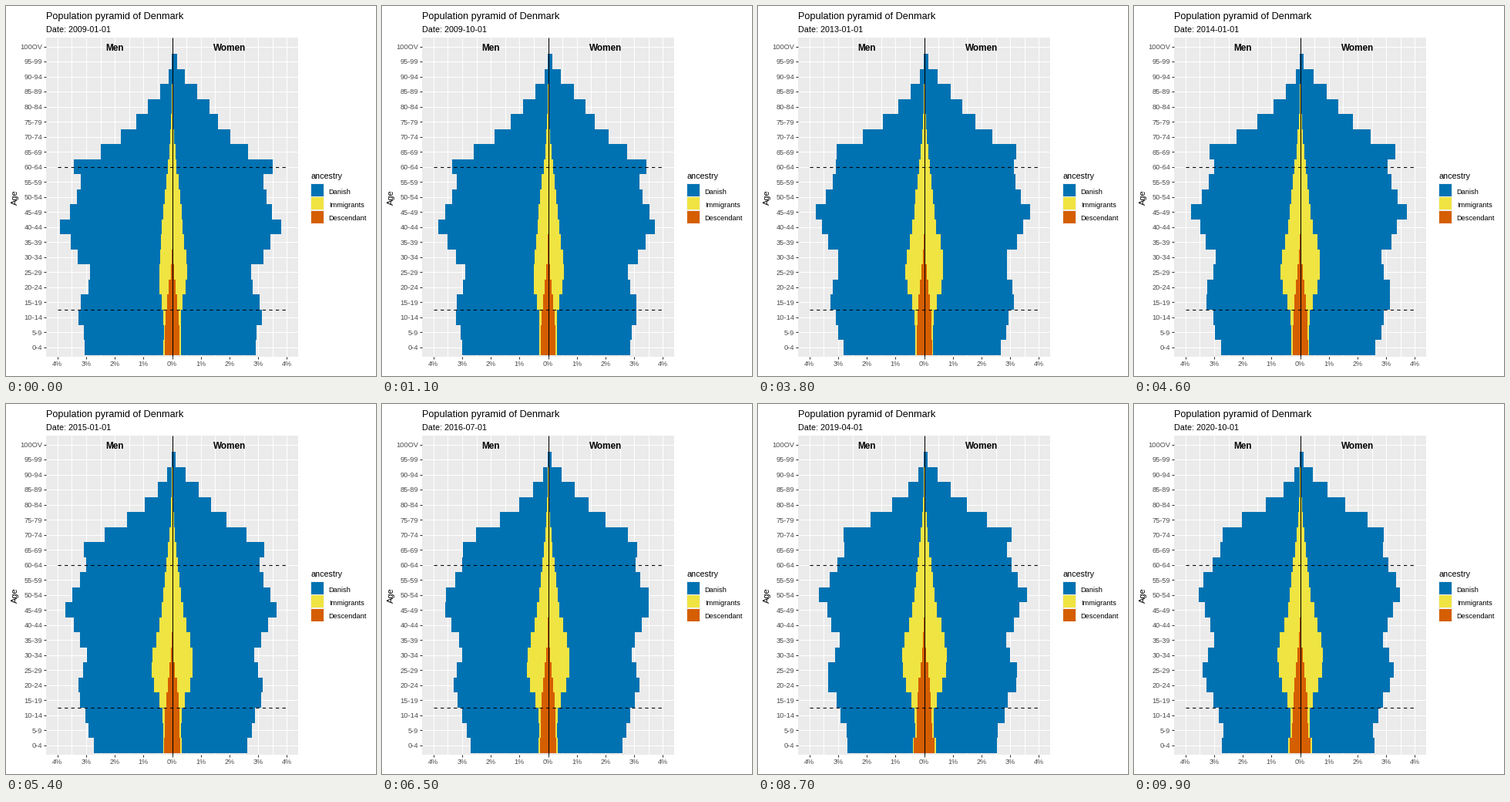
Animation, 480 px wide and 480 px high, one loop 10 s. Source, as a matplotlib script:

```python
import numpy as np
import matplotlib.pyplot as plt
from matplotlib.animation import FuncAnimation
from matplotlib.patches import Polygon, Rectangle

SIZE, DPI = 480, 72
FRAMES, INTERVAL = 100, 100
LEFT, RIGHT, TOP, BOTTOM = 52, 379, 41, 455
MID, UNIT, STEP = 215.55, 37.2, 19.513
BLUE, YELLOW, ORANGE = "#0072B2", "#F0E442", "#D55E00"
GREY = "#4D4D4D"
AGES = [f"{a}-{a + 4}" for a in range(0, 100, 5)] + ["100OV"]
N = len(AGES)
AGE = 5 * np.arange(N) + 2.5  # middle of each group

# Cohort size at birth, in pixels of bar length, every five years.
BIRTH_YEARS = np.arange(1911.5, 2022, 5)
BIRTHS = [27, 27.4, 36, 44, 49, 60, 76.5, 100.5, 91, 94, 100, 110.5,
          101.5, 97.5, 89.5, 97, 111, 118, 113, 113, 105.5, 105, 115]

plt.rcParams.update({"font.family": "Liberation Sans",
                     "figure.dpi": DPI, "savefig.dpi": DPI})


def sigmoid(x):
    return 1 / (1 + np.exp(-x))


def bell(x, mid, width):
    return np.exp(-((x - mid) / width) ** 2)


def population(q):
    """Bar lengths (men, women) of the three stacked layers at quarter q."""
    u = q / 47
    born = 2009 + q / 4 - AGE

    # Cohorts grow by migration, shrink by mortality and by their share.
    hazard = np.exp((AGE - 86.6) / 8.5)
    gain = 0.3 * sigmoid((AGE - 25) / 6) - 0.0015 * q
    men = np.interp(born, BIRTH_YEARS, BIRTHS) * np.exp(gain - hazard)
    survive = (0.75 - 0.25 * u) * hazard / (1 + 0.15 * hazard)
    women = men * (0.945 + 0.0004 * AGE) * np.exp(survive)

    # Immigrants: a plateau of working ages and a growing wave of young adults.
    rise = 0.1 + 0.9 * sigmoid((AGE - 19) / 2.8)
    plateau = 16 * rise * sigmoid((58 + 8 * u - AGE) / 9)
    wave = 11 * (1 - (1 - u) ** 2) * bell(AGE, 27 + 7 * u, 10)

    descendants = (10.5 * sigmoid((21 + 8 * u - AGE) / 5.5)
                   + 4 * sigmoid(born - 2015.5))
    foreign = descendants + plateau + wave
    more_women = 2.6 * bell(AGE, 30.5 + 15 * u, 5) - 0.6
    return ((men, women), (foreign, foreign + more_women),
            (descendants, descendants - 0.8))


EDGES = np.floor(453.03 - STEP * np.arange(N + 1))
BAR_Y = np.column_stack([EDGES[:-1], EDGES[1:]]).ravel()


def stairs(left, right):
    """Outline of mirrored bars, snapped to whole pixels."""
    lx = np.repeat(np.round(216 - np.maximum(left, 0)), 2)
    rx = np.repeat(np.round(216 + np.maximum(right, 0)), 2)
    return np.column_stack([np.r_[lx, rx[::-1]], np.r_[BAR_Y, BAR_Y[::-1]]])


def quarter(frame):
    """The first states are held for two frames, later ones for one."""
    if frame < 15:
        return frame // 3 + (0.5 if frame % 3 == 2 else 0)
    return (frame - 5) / 2


fig = plt.figure(figsize=(SIZE / DPI, SIZE / DPI), dpi=DPI, facecolor="white")
ax = fig.add_axes([0, 0, 1, 1])
ax.set_xlim(0, SIZE)
ax.set_ylim(SIZE, 0)
ax.axis("off")


def box(x, y, w, h, color):
    ax.add_patch(Rectangle((x, y), w, h, fc=color, lw=0, zorder=1))


def line(x0, y0, x1, y1, color, z=2, **kw):
    ax.plot([x0, x1], [y0, y1], color=color, lw=1.07, zorder=z,
            solid_capstyle="butt", dash_capstyle="butt", **kw)


def label(x, y, s, size, color="black", **kw):
    return ax.text(x, y, s, fontsize=size, color=color, zorder=6, **kw)


# Panel, grid and axes
box(LEFT, TOP, RIGHT - LEFT, BOTTOM - TOP, "#EBEBEB")
for k in np.arange(-4, 4.5, 0.5):
    x = MID + UNIT * k
    line(x, TOP, x, BOTTOM, "white")
    if k == int(k):
        line(x, BOTTOM, x, BOTTOM + 3, "#333333")
        label(x, 467.3, f"{abs(int(k))}%", 9, GREY, ha="center")
for i, age in enumerate(AGES):
    y = 443 - STEP * i
    line(LEFT, y, RIGHT, y, "white")
    line(LEFT - 3, y, LEFT, y, "#333333")
    label(47.3, y + 3.2, age, 9.2, GREY, ha="right")

bars = []
for z, color in enumerate((BLUE, YELLOW, ORANGE)):
    bar = Polygon(np.zeros((4 * N, 2)), fc=color, lw=0, aa=False, zorder=3 + 0.1 * z)
    bars.append(ax.add_patch(bar))

line(216, TOP, 216, BOTTOM, "black", 4)
for y in (209, 394):
    line(67, y, 364, y, "black", 5, dashes=(4, 4))

# Titles
label(52, 17, "Population pyramid of Denmark", 12.8)
date = label(52, 34, "", 10.8)
label(MID - 2 * UNIT, 58, "Men", 11.8, weight="bold", ha="center")
label(MID + 2 * UNIT, 58, "Women", 11.8, weight="bold", ha="center")
label(12, 248, "Age", 11, rotation=90, ha="center", va="center")

# Legend
label(396, 223.7, "ancestry", 10.8)
box(395.4, 230.4, 17.3, 51.8, "#F2F2F2")
for i, (name, color) in enumerate([("Danish", BLUE), ("Immigrants", YELLOW),
                                   ("Descendant", ORANGE)]):
    box(396, 231 + 17.28 * i, 16, 16, color)
    label(418.7, 243.5 + 17.2 * i, name, 9.2)


def draw(frame):
    q = quarter(frame)
    for bar, sides in zip(bars, population(q)):
        bar.set_xy(stairs(*sides))
    year, part = divmod(int(q), 4)
    date.set_text(f"Date: {2009 + year}-{3 * part + 1:02d}-01")
    return [*bars, date]


anim = FuncAnimation(fig, draw, frames=FRAMES, interval=INTERVAL,
                     repeat=True, repeat_delay=0, blit=False)
plt.show()
```
